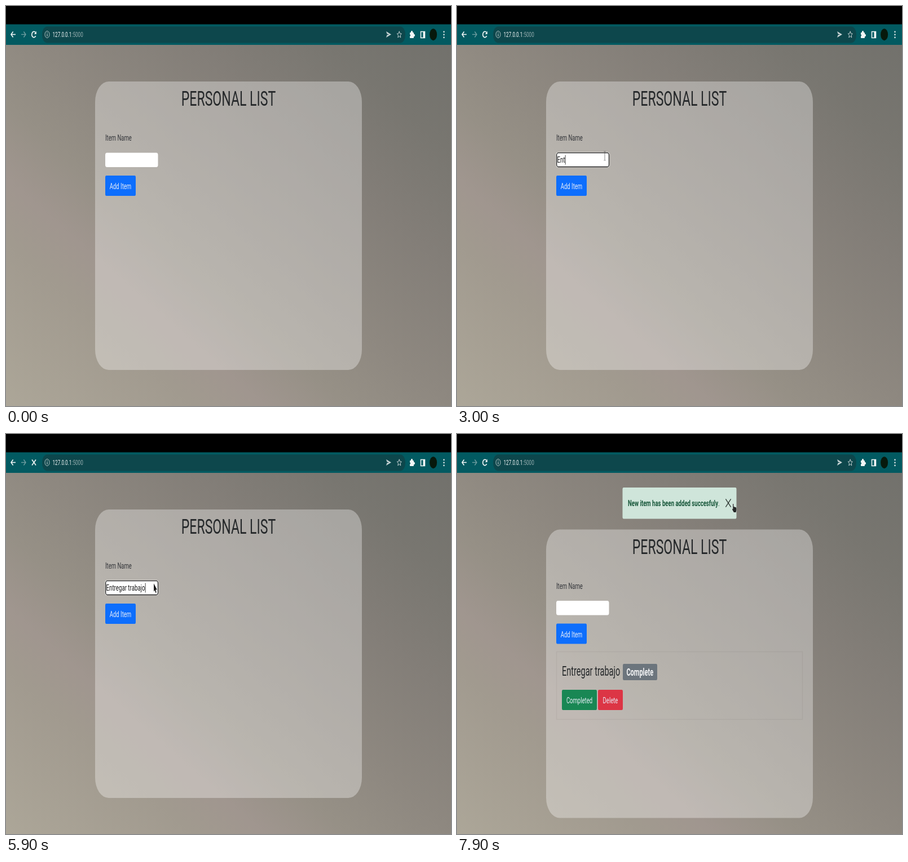
An HTML page with a canvas for the animation above (8000 ms loop, 789 by 710 pixels).

```html
<!DOCTYPE html>
<html lang="en">
<head>
<meta charset="utf-8">
<title>Personal list</title>
<style>
  html, body { margin: 0; width: 100%; height: 100%; overflow: hidden; background: #000; }
  canvas { display: block; }
</style>
</head>
<body>
<canvas id="stage" width="789" height="710"></canvas>
<script>
const ctx = document.getElementById('stage').getContext('2d');
const LOOP = 8000, STEP = 100;
const SQUEEZE = 0.627; // the whole screen is shown narrower than it is
const INK = '#25282a';
const FOCUS = 1800, SUBMIT = 5700, ADDED = 6000, LOADED = 6100;
const ENTRY = 'Entregar trabajo';
const KEY_TIMES = [2600, 2800, 3000, 3200, 3400, 3900, 4000, 4100, 4200,
                   4400, 4500, 4700, 4900, 5000, 5200, 5300];

// time, x, y, pointer shape from here on
const PATH = [
  [800, 716, 258, 'arrow'], [1100, 480, 190, 'arrow'], [1400, 140, 85, 'arrow'],
  [1500, 52, 57, 'arrow'], [1600, 118, 70, 'arrow'], [1700, 215, 225, 'arrow'],
  [1800, 255, 268, 'beam'], [2100, 262, 266, 'beam'], [5700, 262, 266, 'arrow'],
  [6000, 262, 265, 'beam'], [6300, 258, 290, 'arrow'], [6600, 230, 460, 'hand'],
  [6800, 270, 390, 'arrow'], [7000, 390, 180, 'arrow'], [7100, 421, 124, 'beam'],
  [7200, 395, 165, 'arrow'], [7500, 224, 333, 'hand'], [7600, 260, 290, 'arrow'],
  [7800, 445, 160, 'arrow'], [7900, 489, 124, 'hand']
];

function box(x, y, w, h, fill, rx = 2, ry = 3) {
  ctx.beginPath();
  ctx.roundRect(x, y, w, h, { x: rx, y: ry });
  ctx.fillStyle = fill;
  ctx.fill();
}

// returns the x where the text ends
function text(str, x, y, size, color, weight = 400, align = 'left') {
  ctx.save();
  ctx.translate(x, y);
  ctx.scale(SQUEEZE, 1);
  ctx.font = `${weight} ${size}px Roboto, "Open Sans", sans-serif`;
  ctx.textAlign = align;
  ctx.fillStyle = color;
  ctx.fillText(str, 0, 0);
  const end = x + ctx.measureText(str).width * SQUEEZE;
  ctx.restore();
  return end;
}

function line(points, color, width = 1, close = false) {
  ctx.beginPath();
  points.forEach(([x, y]) => ctx.lineTo(x, y));
  if (close) ctx.closePath();
  ctx.strokeStyle = color;
  ctx.lineWidth = width;
  ctx.stroke();
}

function shape(points, fill, outline) {
  ctx.beginPath();
  points.forEach(([x, y]) => ctx.lineTo(x, y));
  ctx.closePath();
  if (outline) {
    ctx.strokeStyle = outline;
    ctx.lineWidth = 1;
    ctx.stroke();
  }
  ctx.fillStyle = fill;
  ctx.fill();
}

function oval(x, y, rx, ry, fill, stroke, from = 0, to = Math.PI * 2) {
  ctx.beginPath();
  ctx.ellipse(x, y, rx, ry, 0, from, to);
  if (fill) { ctx.fillStyle = fill; ctx.fill(); }
  if (stroke) { ctx.strokeStyle = stroke; ctx.stroke(); }
}

function cross(x, y, rx, ry, color, width) {
  line([[x - rx, y - ry], [x + rx, y + ry]], color, width);
  line([[x + rx, y - ry], [x - rx, y + ry]], color, width);
}

function backdrop() {
  const g = ctx.createLinearGradient(789, 69, 128, 820);
  [[0, '#72716c'], [0.14, '#787670'], [0.3, '#837e78'], [0.48, '#8e8880'],
   [0.6, '#969086'], [0.7, '#a0968f'], [0.78, '#a19a8f'], [1, '#aca698']]
    .forEach(([at, color]) => g.addColorStop(at, color));
  ctx.fillStyle = g;
  ctx.fillRect(0, 69, 789, 641);
}

function toolbar(loading) {
  ctx.fillStyle = '#000';
  ctx.fillRect(0, 0, 789, 33);
  ctx.fillStyle = '#025a61';
  ctx.fillRect(0, 32.5, 789, 36.5);
  box(64, 36.5, 644, 29, '#0d474c', 9, 14);

  const white = '#f2f6f6', dim = '#6f9da0', soft = '#b4c6c7';
  line([[17, 50.5], [9, 50.5]], white, 1.6);
  line([[12.6, 45.5], [9, 50.5], [12.6, 55.5]], white, 1.6);
  line([[27, 50.5], [35, 50.5]], dim, 1.4);
  line([[31.4, 45.5], [35, 50.5], [31.4, 55.5]], dim, 1.4);

  if (loading) {
    cross(49.5, 50.5, 3.5, 5, white, 1.6);
  } else {
    ctx.lineWidth = 1.7;
    oval(49.5, 50.5, 3.6, 5.2, null, white, 0.5, 5.5);
    shape([[53.8, 44.5], [53.8, 50], [50, 50]], white);
  }

  ctx.lineWidth = 1;
  oval(73, 50.5, 4, 6, null, soft);
  line([[73, 49.5], [73, 54]], soft, 1.2);
  line([[73, 46.7], [73, 48.2]], soft, 1.2);
  const end = text('127.0.0.1', 82.5, 55, 13, '#f0f5f5');
  text(':5000', end, 55, 13, '#93abad');

  shape([[674, 45], [683, 50.5], [674, 56], [675.5, 51.5], [679, 50.5], [675.5, 49.5]], '#c3d0d1');
  const star = Array.from({ length: 10 }, (_, i) => {
    const r = i % 2 ? 0.45 : 1, a = i * Math.PI / 5;
    return [697.3 + Math.sin(a) * 4.2 * r, 51 - Math.cos(a) * 6.2 * r];
  });
  line(star, '#c3d0d1', 1, true);

  box(716, 47, 7, 10, white, 1, 1);
  oval(719.5, 46.5, 1.7, 2.4, white);
  oval(723.4, 52, 1.6, 2.3, white);
  oval(716, 52, 1.1, 1.6, '#025a61');
  ctx.strokeStyle = white;
  ctx.lineWidth = 1.5;
  ctx.strokeRect(735.5, 45.5, 7, 11);
  ctx.fillStyle = white;
  ctx.fillRect(739.5, 45, 3.5, 12);
  oval(757.6, 50.7, 6.5, 10.5, '#07190c');
  [45.7, 50.7, 55.7].forEach(y => oval(776.5, y, 1.1, 1.5, white));
}

function button(label, x, y, w, color) {
  box(x, y, w, 36, color);
  text(label, x + w / 2, y + 24, 15.2, '#e9eef8', 400, 'center');
}

function form(top, t) {
  box(158, top, 473, 512, 'rgba(255,255,255,0.33)', 24, 36);
  text('PERSONAL LIST', 394.5, top + 43, 36.8, INK, 400, 'center');
  text('Item Name', 176, top + 105, 15.2, '#34363a');

  const focused = t >= FOCUS && t < ADDED;
  if (focused) box(175.5, top + 125.5, 95, 27, 'rgba(255,255,255,0.6)', 3, 4);
  box(176, top + 126.5, 93.5, 25.5, '#fff', 3, 4);
  if (focused) {
    ctx.beginPath();
    ctx.roundRect(176.7, top + 126.7, 92.8, 24.8, { x: 3, y: 4 });
    ctx.strokeStyle = '#222';
    ctx.lineWidth = 1.3;
    ctx.stroke();
    const typed = KEY_TIMES.filter(k => k <= t).length;
    const end = text(ENTRY.slice(0, typed), 177.5, top + 144, 15.5, '#1c1c1c');
    if (t < 2400 || t >= 2600) line([[end + 0.6, top + 130.5], [end + 0.6, top + 147.5]], '#333', 0.9);
  }
  button('Add Item', 176, top + 167, 54, '#0d6efd');
}

function alertBox(hover) {
  box(293.5, 95, 202, 55.5, '#cfe5da', 2, 3);
  const end = text('New item has been added succesfuly', 303, 128, 15.3, '#17573a', 700);
  text('.', end, 128, 15.3, '#17573a');
  cross(481, 122.5, 4.6, 7.2, hover ? '#2e3733' : '#6d7a74', 1.3);
}

function listItem() {
  ctx.strokeStyle = 'rgba(70,60,55,0.07)';
  ctx.lineWidth = 1.5;
  ctx.strokeRect(176.5, 386.5, 436, 120);
  text(ENTRY, 186, 429, 23.2, INK);
  box(294, 408, 61, 29, '#6c757d');
  text('Complete', 324.3, 429, 17.6, '#f3f4f5', 700, 'center');
  button('Completed', 186, 454, 62, '#198754');
  button('Delete', 250, 454, 44, '#dc3545');
}

const pointers = {
  arrow() {
    shape([[0, 0], [0, 14.5], [1.9, 12], [3.3, 16.8], [4.7, 15.6], [3.4, 11.2], [5.8, 11]],
      '#1c1c1c', 'rgba(255,255,255,0.75)');
  },
  beam() {
    const c = 'rgba(70,70,70,0.65)';
    line([[0, -7.5], [0, 7.5]], c, 1);
    line([[-1.8, -8], [1.8, -8]], c, 0.8);
    line([[-1.8, 8], [1.8, 8]], c, 0.8);
  },
  hand() {
    shape([[0, 0], [1.2, 0], [1.6, 5], [6.3, 6.5], [6.5, 11], [5.5, 15], [1.8, 15],
           [-1, 10], [-0.6, 8.5], [0.4, 9.5]], '#252827', 'rgba(240,240,240,0.55)');
  }
};

function pointer(t) {
  if (t < PATH[0][0]) return;
  let i = PATH.length - 1;
  while (PATH[i][0] > t) i--;
  const a = PATH[i], b = PATH[i + 1] || a;
  const k = b === a ? 0 : (t - a[0]) / (b[0] - a[0]);
  ctx.save();
  ctx.translate(a[1] + (b[1] - a[1]) * k, a[2] + (b[2] - a[2]) * k);
  pointers[a[3]]();
  ctx.restore();
}

function draw(t) {
  const added = t >= ADDED;
  backdrop();
  toolbar(t >= SUBMIT && t < LOADED);
  form(added ? 169.5 : 134, t);
  if (added) {
    alertBox(t >= 7900);
    listItem();
  }
  pointer(t);
}

const start = performance.now();
function tick() {
  const t = (performance.now() - start) % LOOP;
  draw(Math.floor(t / STEP) * STEP);
  requestAnimationFrame(tick);
}
tick();
</script>
</body>
</html>
```
